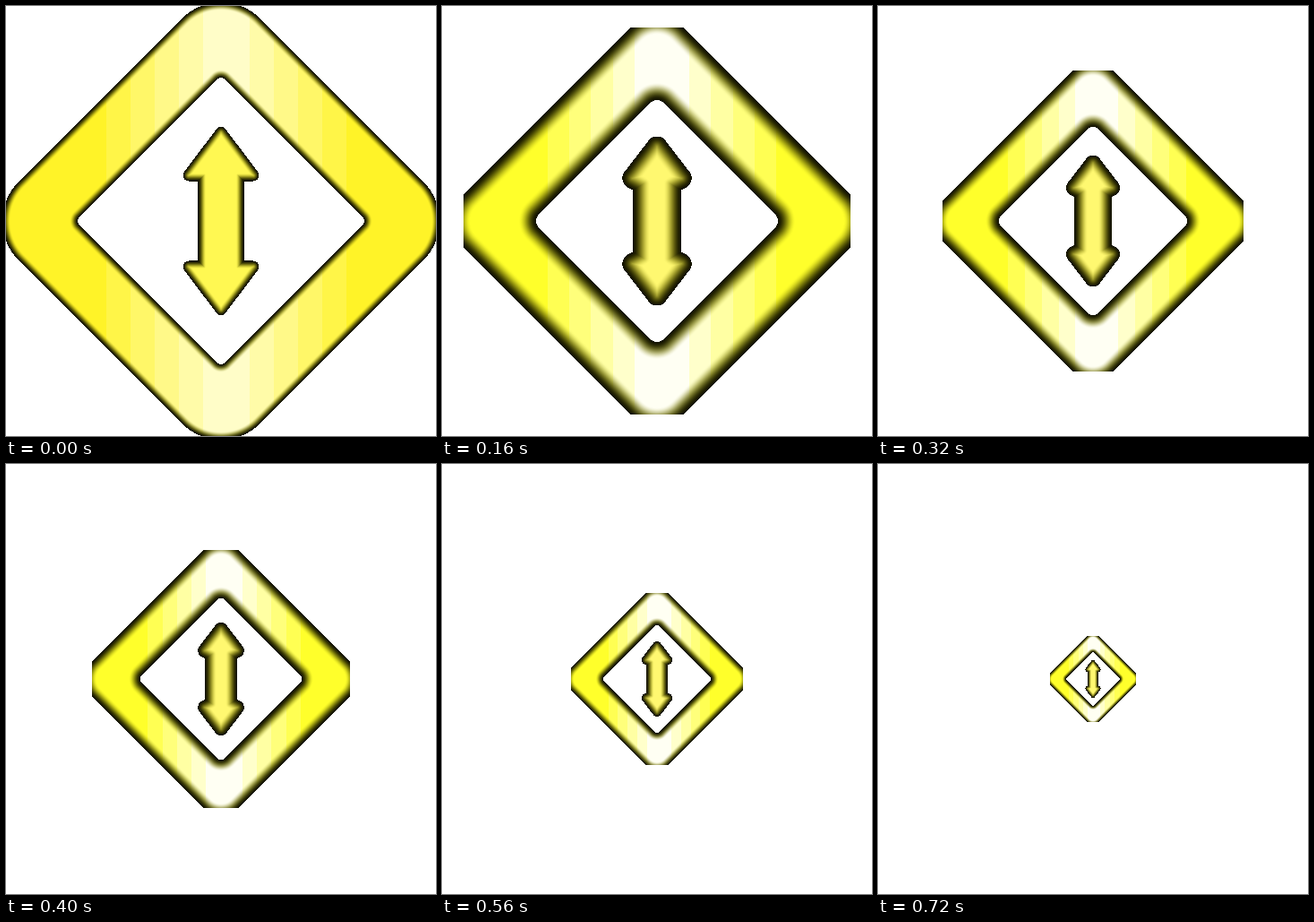
Animation, 480 px wide and 480 px high, one loop 0.76 s. Source, as an HTML page with a canvas:

```html
<!DOCTYPE html>
<html>
<head>
<meta charset="utf-8">
<style>
html, body { margin: 0; width: 100%; height: 100%; overflow: hidden; background: #fff; }
canvas { display: block; width: 480px; height: 480px; }
</style>
</head>
<body>
<canvas id="stage" width="480" height="480"></canvas>
<script>
const SIZE = 480, HALF = SIZE / 2, STEP = 40, STEPS = 19;
const ctx = document.getElementById('stage').getContext('2d');
const lerp = (a, b, k) => a + (b - a) * k;
const clamp = (v, lo, hi) => Math.max(lo, Math.min(hi, v));

// Signed distance to an outline mirrored on both axes; only its quarter is
// given, from the top point down to the x axis. Negative inside.
function distance(points, radius, x, y) {
  let best = Infinity, inside = false;
  for (let i = 1; i < points.length; i++) {
    const [ax, ay] = points[i - 1], [bx, by] = points[i];
    const dx = bx - ax, dy = by - ay;
    const t = clamp(((x - ax) * dx + (y - ay) * dy) / (dx * dx + dy * dy), 0, 1);
    best = Math.min(best, Math.hypot(x - ax - dx * t, y - ay - dy * t));
    if ((ay > y) !== (by > y)) inside = x < ax + dx * (y - ay) / dy;
  }
  return (inside ? -best : best) - radius;
}

const diamond = h => [[0, h], [h, 0]];

function render(step) {
  const k = Math.min(step / 3, 1);                    // bevel growth
  const scale = step < 4 ? 1 : 1 - 0.05 * (step - 2); // then shrinking
  const mix = (a, b) => lerp(a, b, k);
  const outer = diamond(mix(182, 206)), outerR = mix(62, 47);
  const hole = diamond(mix(154, 138)), holeR = mix(6, 12);
  const shaft = mix(19, 17), arrowR = mix(6.5, 13);
  const arrow = [[0, mix(98.5, 92)], [mix(36, 30), mix(51, 53)], [shaft, mix(51, 46)], [shaft, 0]];
  const bevel = mix(9, 22);

  const image = ctx.createImageData(SIZE, SIZE), data = image.data;
  data.fill(255);

  function shade(x, y) {
    const ax = Math.abs(x);
    const holeDepth = distance(hole, holeR, ax, y);
    const onArrow = holeDepth < 0;
    const depth = onArrow
      ? -distance(arrow, arrowR, ax, y)
      : Math.min(holeDepth, -distance(outer, outerR, ax, y));
    if (depth < 0) return null;
    // Vertical colour bands, centred slightly right of the middle
    const band = clamp(Math.floor(1 + (Math.abs(x - 6) - mix(26, 34)) / 27), 0, 5);
    const green = onArrow ? 248 : mix(253 - 2 * band, 255);
    const blue = onArrow ? mix(82, 112) : mix(200 - 32 * band, 243 - 40 * band);
    const t = Math.min(1, depth / bevel);
    const light = 0.08 + 0.92 * t * t * (3 - 2 * t);
    return [255 * light, green * light, blue * light * light];
  }

  const reach = Math.round(HALF * scale);
  for (let y = 0; y < reach; y++) {
    for (let x = -reach; x < reach; x++) {
      const color = shade((x + 0.5) / scale, (y + 0.5) / scale);
      if (!color) continue;
      for (const py of [HALF + y, HALF - 1 - y])
        data.set(color, (py * SIZE + HALF + x) * 4);
    }
  }
  return image;
}

const cache = Array.from({ length: STEPS }, (_, step) => render(step));

function draw() {
  ctx.putImageData(cache[Math.floor(performance.now() / STEP) % STEPS], 0, 0);
  requestAnimationFrame(draw);
}
draw();
</script>
</body>
</html>
```
